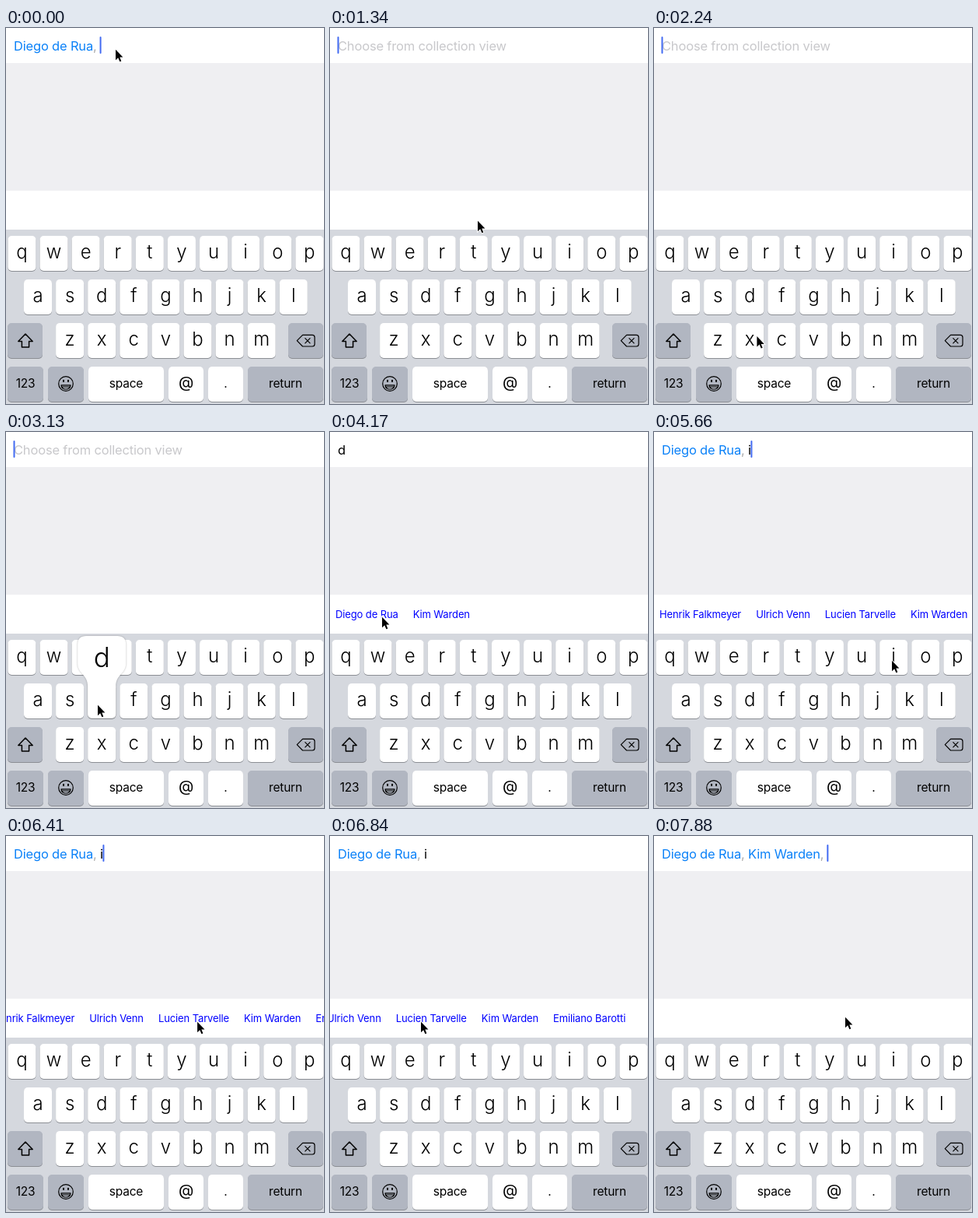
Write an HTML page that moves like this. It is 409 by 483 pixels and loops after 8 s.

```html
<!DOCTYPE html>
<html lang="en">
<head>
<meta charset="utf-8">
<title>Token field</title>
<style>
html, body { margin: 0; width: 100%; height: 100%; overflow: hidden; background: #fff; }
svg { display: block; width: 409px; height: 483px; font-family: Inter, Roboto, "Liberation Sans", sans-serif; }
text { white-space: pre; }
.field { font-size: 16.5px; letter-spacing: -.18px; }
.token { fill: #0c82f8; }
.comma { fill: #aaa; }
.hint { fill: #c8c8cb; }
.pick { font-size: 13px; letter-spacing: -.12px; fill: #00f; }
.letter, .word, .big { text-anchor: middle; }
.letter { font-size: 24px; font-weight: 350; }
.word { font-size: 15.5px; letter-spacing: -.2px; }
.big { font-size: 35px; font-weight: 300; }
.icon { fill: none; stroke: #000; stroke-width: 1.2; stroke-linejoin: round; stroke-linecap: round; }
</style>
</head>
<body>
<svg id="stage" viewBox="0 0 409 483">
  <rect width="409" height="483" fill="#fff"/>
  <rect y="45" width="409" height="164" fill="#efeff2"/>
  <g id="field" class="field"></g>
  <rect id="caret" y="11" width="2" height="22" rx="1" fill="#426bf2"/>
  <g id="picks" class="pick"></g>
  <rect y="259" width="409" height="224" fill="#d5d8de"/>
  <g id="keys"></g>
  <g class="icon">
    <path d="M25 393L34.2 402.4H29.6V410H20.4V402.4H15.8Z" stroke-width="1.5"/>
    <path d="M381.5 394.4H394Q397 394.4 397 397.4V406Q397 409 394 409H381.5L374.3 401.7ZM384.8 398.6L391 404.8M391 398.6L384.8 404.8"/>
    <circle cx="77" cy="457" r="9.3"/>
    <path d="M71 458.8H83Q82.3 464 77 464T71 458.8ZM72 461H82"/>
    <path d="M74 452.8V454M80 452.8V454" stroke-width="2"/>
  </g>
  <g id="popup">
    <path d="M-31-50Q-31-61-20-61H20Q31-61 31-50V-26C31-12 18-12 18 4V39Q18 44 13 44H-13Q-18 44-18 39V4C-18-12-31-12-31-26Z"
      fill="#fff" style="filter:drop-shadow(0 .5px 1.2px rgba(0,0,0,.28))"/>
    <text class="big" y="-21"></text>
  </g>
  <path id="mouse" d="M1 1.8V15.2L4.2 12.3L6.4 17.2L8.3 16.4L6.3 11.6H10.4Z" stroke="#fff" stroke-width="1.8" paint-order="stroke"/>
</svg>
<script>
const LOOP = 8000, STEP = 148.6, WIDTH = 409;
const $ = id => document.getElementById(id);
const show = (el, on) => el.setAttribute('visibility', on ? 'visible' : 'hidden');
const move = (el, x, y) => el.setAttribute('transform', `translate(${x} ${y})`);

function add(parent, tag, attrs, text = '') {
  const el = document.createElementNS('http://www.w3.org/2000/svg', tag);
  for (const a in attrs) el.setAttribute(a, attrs[a]);
  el.textContent = text;
  parent.append(el);
  return el;
}

// Keyboard
const rowY = r => 267 + 56 * r;
const keyPos = {};
function key(x, y, w, label, cls = 'word', fill = '#fff') {
  const box = { x, width: w, height: 45, rx: 5 };
  add($('keys'), 'rect', { ...box, y: y + 1, fill: '#8b8e94' });
  add($('keys'), 'rect', { ...box, y, fill });
  add($('keys'), 'text', { x: x + w / 2, y: y + (cls === 'letter' ? 29.2 : 27.2), class: cls }, label);
  keyPos[label] = [x + w / 2, y];
}
['qwertyuiop', 'asdfghjkl', 'zxcvbnm'].forEach((row, r) =>
  [...row].forEach((c, i) => key(187.4 + (i - (row.length - 1) / 2) * 41.1, rowY(r), 36, c, 'letter')));
const dark = '#b1b6c1';
key(2, rowY(2), 45, '', 'word', dark);
key(363, rowY(2), 45, '', 'word', dark);
key(2, rowY(3), 46, '123', 'word', dark);
key(54, rowY(3), 46, '', 'word', dark);
key(106, rowY(3), 97, 'space');
key(209, rowY(3), 45, '@');
key(260, rowY(3), 45, '.');
key(311, rowY(3), 97, 'return', 'word', dark);
const at = [...$('keys').children].find(el => el.textContent === '@');
at.style.fontSize = '20px';

// Field states by starting step; a typed key pops up one step earlier
const [DIEGO, KIM] = ['Diego de Rua', 'Kim Warden'];
const states = [
  { from: 0, tokens: [DIEGO], hold: 1 },
  { from: 3, tokens: [], hint: 'Choose from collection view', hold: 7 },
  { from: 22, tokens: [], typed: 'd', delay: 3 },
  { from: 31, tokens: [DIEGO] },
  { from: 38, tokens: [DIEGO], typed: 'i', delay: 0 },
  { from: 51, tokens: [DIEGO, KIM] }
];
const names = [DIEGO, 'Henrik Falkmeyer', 'Ulrich Venn', 'Lucien Tarvelle', KIM, 'Emiliano Barotti'];

for (const s of states) {
  s.el = add($('field'), 'text', { x: 10, y: 28.7 });
  for (const t of s.tokens) {
    add(s.el, 'tspan', { class: 'token' }, t);
    add(s.el, 'tspan', { class: 'comma' }, ', ');
  }
  if (s.typed) add(s.el, 'tspan', {}, s.typed);
  s.caret = 10 + s.el.getComputedTextLength();
  if (s.hint) add(s.el, 'tspan', { class: 'hint' }, s.hint);

  // Matching names not chosen yet, laid out in a row
  s.list = add($('picks'), 'g', {});
  let x = 7;
  if (s.typed) for (const n of names) {
    if (s.tokens.includes(n) || !n.toLowerCase().includes(s.typed)) continue;
    x += add(s.list, 'text', { x, y: 239 }, n).getComputedTextLength() + 19;
  }
  s.end = Math.max(0, x - 12 - WIDTH);
}

// Pointer moves: [start step, end step, x, y]
const DRAG = 42, DROP = 46, GRAB = 269;
const moves = [
  [0, 1, 157, 55], [2, 3, 273, 462], [7, 9, 189, 246], [9, 16, 128, 403], [16, 20, 117, 349], [21, 22, 42, 335],
  [24, 28, 66, 236], [31, 36, 305, 292], [38, DRAG, GRAB, 237], [DRAG, DROP, 116, 237], [DROP, 52, 245, 231]
];
const ease = u => u * u * (3 - 2 * u);

function pointer(k) {
  let x = 140, y = 26;
  for (const [a, b, toX, toY] of moves) {
    const u = ease(Math.min(1, Math.max(0, (k - a) / (b - a))));
    x += (toX - x) * u;
    y += (toY - y) * u;
  }
  return [x, y];
}

// Drag with a rubber band past the end, then spring back
function scroll(k, end) {
  if (k < DRAG) return 0;
  const d = GRAB - pointer(Math.min(k, DROP))[0];
  const over = Math.max(0, d - end) * .55;
  return Math.min(d, end) + over * Math.exp(-1.1 * Math.max(0, k - DROP));
}

function caretOn(age, hold = 6) {
  return age < hold || (age - hold) % 7 > 2;
}

function draw(k) {
  const now = states.filter(s => s.from <= k).pop();
  for (const s of states) {
    show(s.el, s === now);
    show(s.list, s === now && k >= s.from + s.delay);
  }
  move(now.list, -scroll(k, now.end), 0);
  $('caret').setAttribute('x', now.caret - .5);
  show($('caret'), caretOn(k - now.from, now.hold));

  const next = states.find(s => s.typed && s.from === k + 1);
  show($('popup'), next);
  if (next) {
    move($('popup'), ...keyPos[next.typed]);
    $('popup').lastElementChild.textContent = next.typed;
  }
  move($('mouse'), ...pointer(k));
}

function tick() {
  draw(Math.floor(performance.now() % LOOP / STEP));
  requestAnimationFrame(tick);
}
tick();
</script>
</body>
</html>
```
